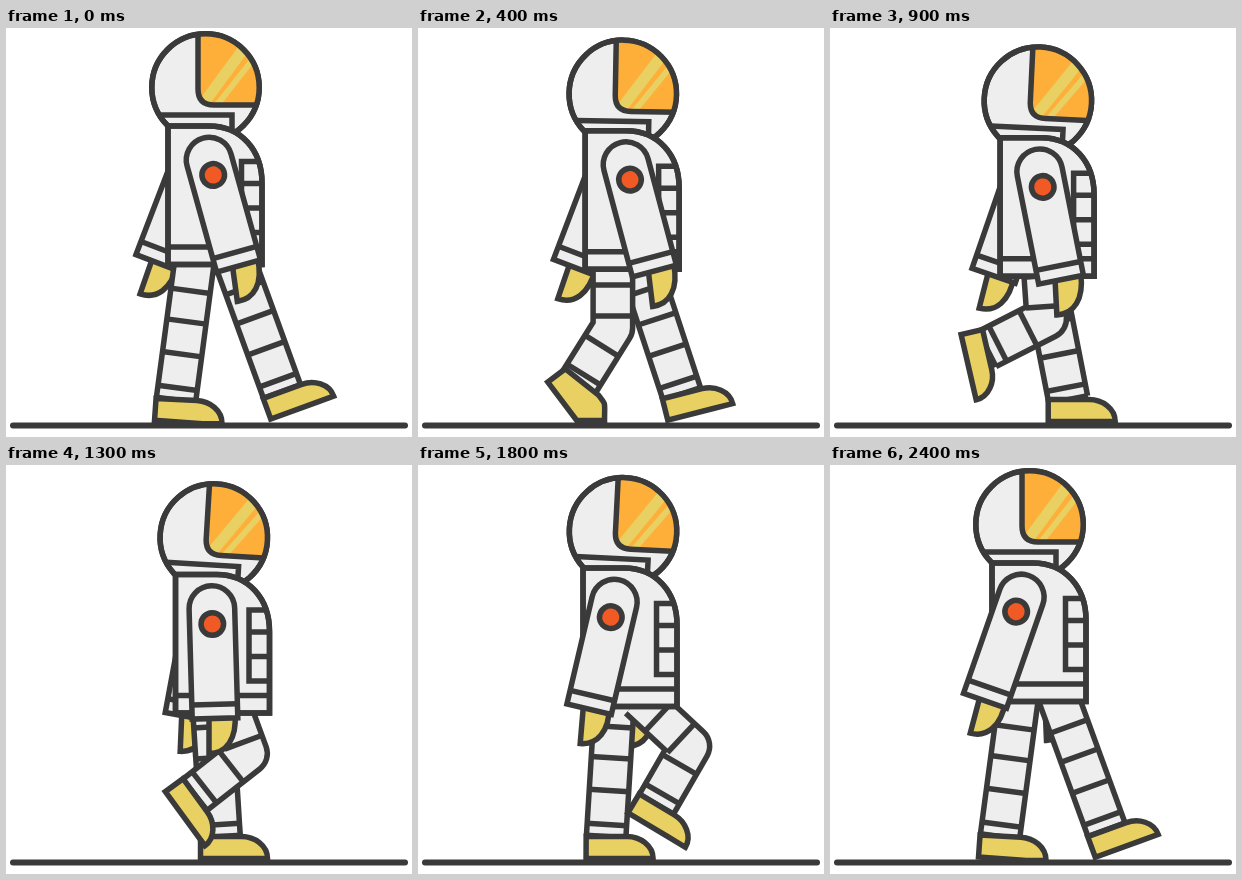
An HTML page with a canvas for the animation above (2500 ms loop, 406x409 px).

```html
<!DOCTYPE html>
<html lang="en">
<head>
<meta charset="utf-8">
<title>Walking astronaut</title>
<style>
  html, body { margin: 0; width: 100%; height: 100%; overflow: hidden; background: #fff; }
  canvas { display: block; width: 406px; height: 409px; }
</style>
</head>
<body>
<canvas id="stage"></canvas>
<script>
const W = 406, H = 409, LOOP = 2500, STEP = 100, STRIDE = 2400;
const INK = '#3a3a3a', SUIT = '#eeeeee', GOLD = '#e8d062', VISOR = '#fdaf39', BADGE = '#f15a24';
const LINE = 5.5, LEG = 39.5, SHIN = 67, HEEL = 20, SOLE = 22, BALL = 48;

// Swinging leg: progress, then thigh, shin and foot angles in degrees.
const swingKeys = [
  [0, -7.6, -7.6, 4],
  [0.167, 0, -32, 53],
  [0.375, 4, -63, 77],
  [0.54, 20, -52, 54],
  [0.75, 47, -30, 31],
  [0.833, 35, -8, 10],
  [1, 20, 20, -20]
];

const canvas = document.getElementById('stage');
const ctx = canvas.getContext('2d');
const scale = window.devicePixelRatio || 1;
canvas.width = W * scale;
canvas.height = H * scale;

const { PI, sin, cos, tanh } = Math;
const rad = deg => deg * PI / 180;
const mix = (a, b, u) => a + (b - a) * u;
const smooth = u => {
  u = Math.min(1, Math.max(0, u));
  return u * u * (3 - 2 * u);
};
const polar = (x, y, deg, d) => [x + sin(rad(deg)) * d, y + cos(rad(deg)) * d];

// Monotone cubic through the keys, so nothing overshoots a pose.
function sample(keys, column, p) {
  const last = keys.length - 1;
  const slope = i => (keys[i + 1][column] - keys[i][column]) / (keys[i + 1][0] - keys[i][0]);
  const tangent = i => {
    if (i === 0) return slope(0);
    if (i === last) return slope(last - 1);
    const a = slope(i - 1), b = slope(i);
    return a * b > 0 ? 2 * a * b / (a + b) : 0;
  };
  let i = 0;
  while (i < last - 1 && p >= keys[i + 1][0]) i++;
  const h = keys[i + 1][0] - keys[i][0], u = (p - keys[i][0]) / h;
  return mix(keys[i][column], keys[i + 1][column], smooth(u))
    + h * u * (1 - u) * (tangent(i) * (1 - u) - tangent(i + 1) * u);
}

function bodyPose(p) {
  const arc = sin(PI * p ** 0.87);
  const lag = 2.5 * sin(PI * p ** 3) ** 2;
  return {
    x: 8.4 * arc - lag,
    y: 12.4 * arc ** 2,
    lag,
    headX: 8.6 * arc,
    headY: 13.8 * arc ** 1.6,
    headTilt: 3.5 * sin(PI * p ** 1.3),
    nearArm: -2.2 - 17.9 * tanh(4.5 * (p - 0.59)),
    farArm: -5.2 + 15.8 * tanh(6 * (p - 0.6))
  };
}

function swingPose(p, body) {
  const [thigh, shin, tilt] = [1, 2, 3].map(column => sample(swingKeys, column, p));
  const hip = [mix(188, 230, smooth(p / 0.65)), 237 + body.y];
  const knee = polar(...hip, thigh, 69 - 2.3 * body.y);
  const lifted = smooth((p - 0.167) / 0.15);
  return { hip, knee, ankle: polar(...knee, shin, SHIN), thigh, shin, tilt, bend: Math.max(0, tilt * (1 - lifted)) };
}

function standPose(p, body) {
  const q = p ** 0.95;
  const hip = [mix(230, 188, p) - body.lag, 237 + body.y];
  const tilt = -20 * (1 - smooth((p - 0.06) / 0.3)) + 4 * p ** 10;
  const ankle = [mix(276, 170, mix(q, (1 - cos(PI * q)) / 2, 0.65)), 371.5 + 0.4 * Math.min(0, tilt)];
  const lean = Math.atan2(ankle[0] - hip[0], ankle[1] - hip[1]) * 180 / PI;
  return { hip, knee: polar(...ankle, lean, -SHIN), ankle, thigh: lean, shin: lean, tilt, bend: Math.max(0, tilt) };
}

function at(x, y, deg, draw) {
  ctx.save();
  ctx.translate(x, y);
  ctx.rotate(rad(deg));
  draw();
  ctx.restore();
}

function paint(fill, path) {
  const shape = new Path2D(path);
  if (fill) {
    ctx.fillStyle = fill;
    ctx.fill(shape);
  }
  ctx.stroke(shape);
}

function disc(r, fill, y = 0) {
  ctx.beginPath();
  ctx.arc(0, y, r, 0, 7);
  if (fill) {
    ctx.fillStyle = fill;
    ctx.fill();
  }
  ctx.stroke();
}

function clipped(path, draw) {
  ctx.save();
  ctx.clip(new Path2D(path));
  draw();
  ctx.restore();
}

function drawGlare() {
  ctx.fillStyle = VISOR;
  ctx.fillRect(-60, -60, 120, 120);
  ctx.strokeStyle = GOLD;
  ctx.lineWidth = 11;
  paint(null, 'M45 -48L-8 24');
  ctx.lineWidth = 6;
  paint(null, 'M52 -34L8 22');
}

function drawHead() {
  const visor = 'M-7.5 -60V1.5Q-7.5 17.5 8.5 17.5H60V-60Z';
  disc(53.7, SUIT);
  clipped('M-53.7 0A53.7 53.7 0 0 1 53.7 0A53.7 53.7 0 0 1 -53.7 0Z', () => {
    clipped(visor, drawGlare);
    paint(null, visor);
  });
  disc(53.7);
  paint(null, 'M-46 27.5H26.5V46');
}

function drawBody() {
  const torso = 'M162 98H203C235 98 256 122 256 155V236.5H162Z';
  paint(SUIT, torso);
  paint(null, 'M162 219H256');
  clipped(torso, () =>
    paint(null, 'M256 133.5H235.5V204.5H256M235.5 155.5H256M235.5 180H256'));
  paint(null, torso);
}

function drawArm(body, angle, badge) {
  const hand = angle ** 3 / 480;
  at(body.x + 197.8 + 0.34 * angle, body.y + 132, -angle, () => {
    at(0, 110, angle - hand, () => paint(GOLD, 'M-6 -5V35C11 35 22 21 20 -5Z'));
    paint(SUIT, 'M-22.8 110V0A22.8 22.8 0 0 1 22.8 0V110Z');
    paint(null, 'M-22.8 96H22.8');
    if (badge) disc(11.3, BADGE, 15.5);
  });
}

// The toe turns back by the bend angle, so it can stay flat while the heel lifts.
function drawFoot([x, y], tilt, bend) {
  const toe = 19 + bend / 6, rise = 13 + bend / 8, lift = -bend / 5;
  const c = cos(rad(bend)), s = sin(rad(bend));
  const tip = [BALL + toe * c, SOLE - toe * s];
  const top = [tip[0] - rise * s, tip[1] - rise * c];
  at(x, y, tilt, () => {
    ctx.translate(-HEEL, 0);
    paint(GOLD, `M0 0L41 ${lift}C54 ${lift} ${top} ${tip}L${BALL} ${SOLE}H0Z`);
  });
}

function drawLeg({ hip, knee, ankle, thigh, shin, tilt, bend }) {
  const limb = new Path2D(`M${polar(...hip, thigh, -12)}L${knee}L${ankle}`);
  const stripe = (joint, angle, d) =>
    at(...polar(...joint, angle, d), -angle, () => paint(null, 'M-20 0H20'));
  ctx.save();
  ctx.lineJoin = 'round';
  for (const [width, color] of [[LEG + LINE, INK], [LEG - LINE, SUIT]]) {
    ctx.lineWidth = width;
    ctx.strokeStyle = color;
    ctx.stroke(limb);
  }
  ctx.restore();
  stripe(knee, thigh, -43);
  stripe(knee, thigh, -12);
  stripe(knee, shin, 21);
  stripe(ankle, shin, -12);
  stripe(ankle, shin, 0);
  drawFoot(ankle, tilt, bend);
}

function drawGround() {
  ctx.save();
  ctx.lineWidth = 6;
  ctx.lineCap = 'round';
  paint(null, 'M7 397.5H399');
  ctx.restore();
}

function render(t) {
  const p = t / STRIDE, body = bodyPose(p);
  ctx.setTransform(scale, 0, 0, scale, 0, 0);
  ctx.fillStyle = '#fff';
  ctx.fillRect(0, 0, W, H);
  ctx.strokeStyle = INK;
  ctx.lineWidth = LINE;
  drawGround();
  drawArm(body, body.farArm, false);
  drawLeg(standPose(p, body));
  drawLeg(swingPose(p, body));
  at(199.5 + body.headX, 59.5 + body.headY, body.headTilt, drawHead);
  at(body.x, body.y, 0, drawBody);
  drawArm(body, body.nearArm, true);
}

const start = performance.now();
function tick() {
  const t = (performance.now() - start) % LOOP;
  render(Math.floor(t / STEP) * STEP);
  requestAnimationFrame(tick);
}
tick();
</script>
</body>
</html>
```
